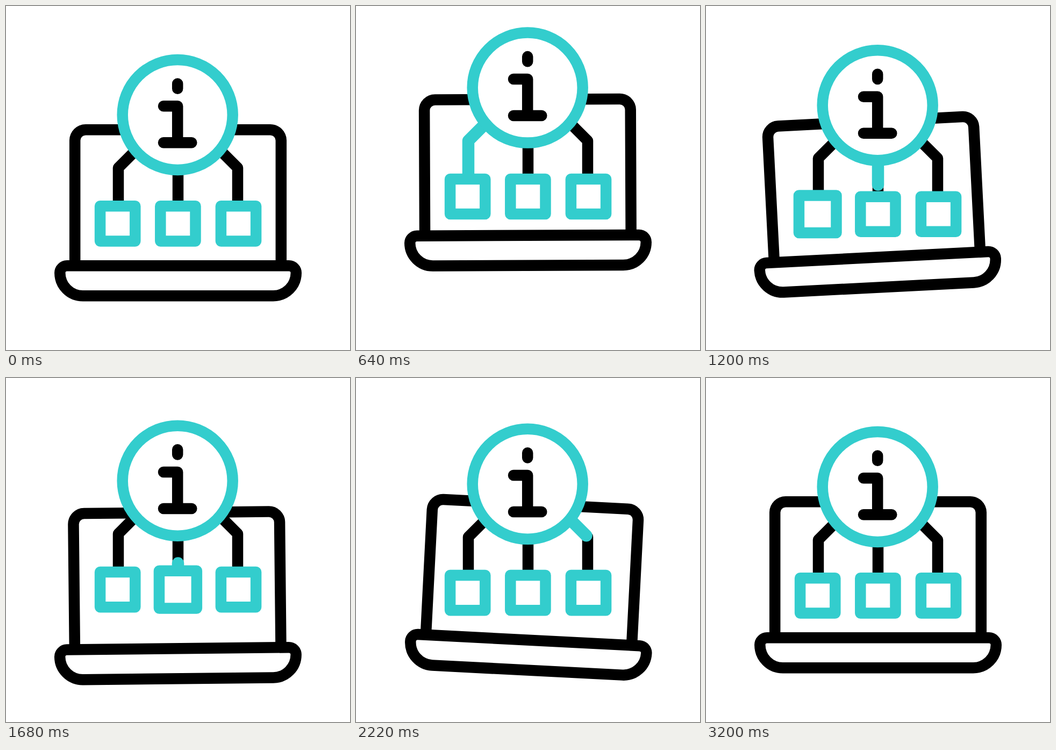
These frames come from a looping animation (640x640 px, 3.56 s). An HTML page:

```html
<!DOCTYPE html>
<html lang="en">
<head>
<meta charset="utf-8">
<title>Laptop information network</title>
<style>
html, body { margin: 0; width: 100%; height: 100%; overflow: hidden; background: #fff; }
svg { display: block; width: 100%; height: 100%; fill: none; stroke: #000; stroke-width: 20.5; stroke-linejoin: round; }
.teal { stroke: #33cdcd; }
.pulse { stroke: #33cdcd; stroke-width: 22.5; stroke-linecap: round; }
.letter { stroke-linecap: round; }
</style>
</head>
<body>
<svg viewBox="0 0 640 640">
  <g id="laptop">
    <path d="M128.2 484V250a20 20 0 0 1 20-19.8H491.8a20 20 0 0 1 20 19.8V484"/>
    <path d="M113.5 483.3H526.5a13.3 13.3 0 0 1 13.3 13.3a42.7 42.7 0 0 1-42.7 42.7H143a42.7 42.7 0 0 1-42.7-42.7a13.3 13.3 0 0 1 13.2-13.3z"/>
  </g>
  <g id="network">
    <g id="links"></g>
    <g id="boxes" class="teal"></g>
    <circle class="teal" cx="319.2" cy="202.5" r="102.5" fill="#fff"/>
    <path class="letter" d="M319.2 144.5V153.7M293 186.3H319.2V254.3M293 254.3H345.3"/>
  </g>
</svg>
<script>
const LOOP = 3560, BOX = 65.2, BOX_Y = 372.3, SWELL = 2.7, SWELL_TIME = 300;
const $ = id => document.getElementById(id);

const linear = u => u;
const fall = u => u * u;
const swing = u => (1 - Math.cos(Math.PI * u)) / 2;

const progress = (t, from, to) => Math.min(1, Math.max(0, (t - from) / (to - from)));

// A track is a chain of moves from rest: each starts where the last one ended.
const track = (...moves) => t => {
  let value = 0;
  for (const [from, to, goal, ease] of moves)
    value += (goal - value) * ease(progress(t, from, to));
  return value;
};

const networkY = track([200, 590, -50.8, swing], [590, 1320, -15.4, swing], [1320, 2680, 0, linear]);
const laptopY = track([200, 620, -56.5, swing], [650, 1420, 23, fall], [1420, 2540, 0, swing]);
const laptopTurn = track([500, 1280, -3, swing], [1280, 2200, 3, swing], [2200, 3120, 0, linear]);

// Light fills each link, then drains into its box, which swells.
const nodes = [
  { x: 175.1, d: "M245 265L209 301V365", fill: [200, 600], drain: [660, 1140] },
  { x: 287.3, d: "M320 300V365", fill: [1000, 1260], drain: [1380, 1730] },
  { x: 399.9, d: "M395 265L431 301V365", fill: [2040, 2480], drain: [2560, 2960] }
];

function add(parent, tag, attrs) {
  const el = document.createElementNS("http://www.w3.org/2000/svg", tag);
  set(el, attrs);
  return parent.appendChild(el);
}

function set(el, attrs) {
  for (const name in attrs) el.setAttribute(name, attrs[name]);
}

for (const n of nodes) {
  add($("links"), "path", { d: n.d });
  n.light = add($("links"), "path", { d: n.d, class: "pulse", pathLength: 1 });
  n.box = add($("boxes"), "rect", {});
}

function draw(t) {
  set($("network"), { transform: `translate(0 ${networkY(t)})` });
  set($("laptop"), { transform: `translate(0 ${laptopY(t)}) rotate(${laptopTurn(t)} 320 512)` });
  for (const { x, fill, drain, light, box } of nodes) {
    const head = progress(t, ...fill), tail = progress(t, ...drain);
    set(light, {
      visibility: head > tail ? "visible" : "hidden",
      "stroke-dasharray": `${head - tail} 3`,
      "stroke-dashoffset": -tail
    });
    const swellStart = drain[1] - SWELL_TIME / 2;
    const grow = SWELL * Math.sin(Math.PI * progress(t, swellStart, swellStart + SWELL_TIME));
    const size = BOX + 2 * grow;
    set(box, { x: x - grow, y: BOX_Y - grow, width: size, height: size });
  }
}

const start = performance.now();
function tick() {
  draw((performance.now() - start) % LOOP);
  requestAnimationFrame(tick);
}
tick();
</script>
</body>
</html>
```
